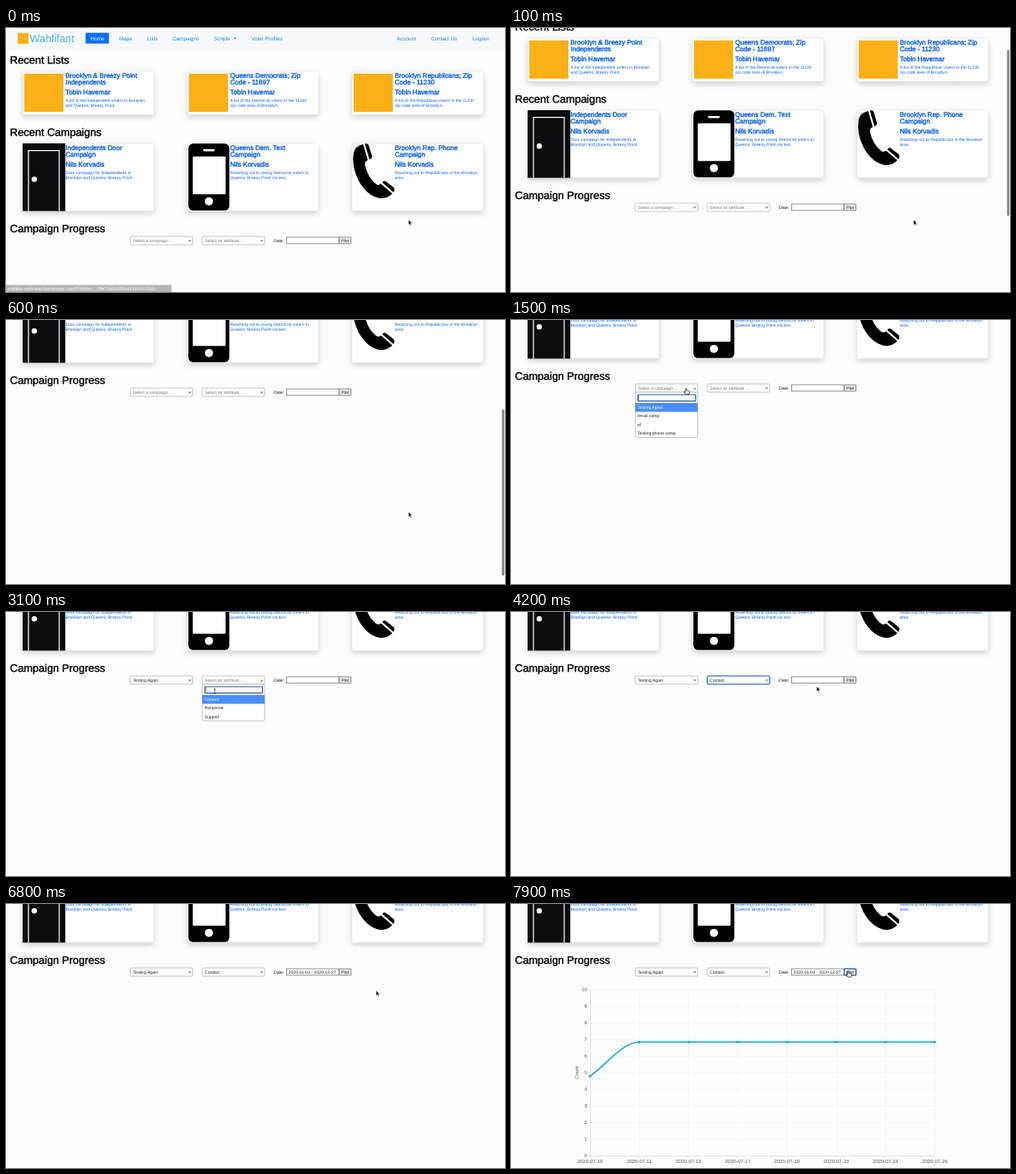
These frames come from a looping animation (600x318 px, 8000 ms). An HTML page:

```html
<!DOCTYPE html>
<html lang="en">
<head>
<meta charset="utf-8">
<title>Campaign dashboard</title>
<style>
  html, body { margin: 0; width: 100%; height: 100%; overflow: hidden; background: #fefdfe; }
  svg { display: block; width: 100%; height: 100%; }
  text { font-family: "Liberation Sans", Arial, sans-serif; text-rendering: geometricPrecision; white-space: pre; }
  .medium { stroke: currentColor; stroke-width: .4; }
  .card { filter: drop-shadow(0 3px 3px rgba(0, 0, 0, .17)); }
</style>
</head>
<body>
<svg id="stage" viewBox="0 0 600 318" xmlns="http://www.w3.org/2000/svg">
  <g id="page"></g>
  <g id="status"></g>
  <rect id="thumb" x="596.4" width="2.8" height="200" rx="1.4" fill="#858585"/>
  <g id="cursor">
    <path id="arrow" d="M0 0V6.4L1.5 5L2.5 7.3L3.6 6.8L2.6 4.6H4.6Z" fill="#111" stroke="#fff" stroke-width=".5"/>
    <path id="hand" d="M-.7 .6Q0-.4 .7 .6V2.8L3.6 3.5Q4.2 3.8 4 4.8L3.3 7.6H-.4L-2.5 4.6Q-2.4 3.6-1.5 4.1L-.7 4.8Z" fill="#fff" stroke="#111" stroke-width=".75"/>
    <path id="beam" d="M-1.3-3Q0-3 0-2Q0-3 1.3-3M0-2V2M-1.3 3Q0 3 0 2Q0 3 1.3 3" fill="none" stroke="#222" stroke-width=".7"/>
  </g>
</svg>
<script>
const LOOP = 8000, STEP = 100, MAX_SCROLL = 174;
const BLUE = '#0b6ff2', LINK = '#0a5fe2', NAV_LINK = '#1585e2', ORANGE = '#fcb017', INK = '#0c0c0e';
const byId = id => document.getElementById(id);

// Drawing helpers
const text = (x, y, size, str, fill = '#333', extra = '') =>
  `<text x="${x}" y="${y}" font-size="${size}" fill="${fill}" ${extra}>${str.replace(/&/g, '&amp;')}</text>`;
const medium = (x, y, size, str, fill) =>
  text(x, y, size, str, fill, `class="medium" color="${fill}"`);
const centered = (x, y, size, str, fill, extra = '') =>
  text(x, y, size, str, fill, `text-anchor="middle" ${extra}`);
const rect = (x, y, w, h, fill, extra = '') =>
  `<rect x="${x}" y="${y}" width="${w}" height="${h}" fill="${fill}" ${extra}/>`;
const path = (d, fill, extra = '') => `<path d="${d}" fill="${fill}" ${extra}/>`;
const circle = (x, y, r, fill) => `<circle cx="${x}" cy="${y}" r="${r}" fill="${fill}"/>`;
const outline = (color, width = .6, radius = 1.2) =>
  `stroke="${color}" stroke-width="${width}" rx="${radius}"`;
const during = (from, to, content) => `<g data-from="${from}" data-to="${to}">${content}</g>`;
const shifted = (dy, content) => `<g transform="translate(0 ${dy})">${content}</g>`;

function navbar() {
  const links = [[136, 'Maps'], [169.5, 'Lists'], [200, 'Campaigns'], [250, 'Scripts'],
    [295, 'Voter Profiles'], [470, 'Account'], [511, 'Contact Us'], [561, 'Logout']];
  return rect(0, 0, 600, 27, '#f7f8fa') + rect(14, 6, 13, 13, ORANGE) +
    text(28.5, 17, 13, 'Wahlifant', '#4db0e8') +
    rect(95.6, 5.8, 28.2, 13, BLUE, 'rx="1.4"') + text(101.6, 14.8, 6.3, 'Home', '#fff') +
    links.map(([x, label]) => text(x, 14.8, 6.35, label, NAV_LINK)).join('') +
    path('M273.5 11.4h4l-2 2z', NAV_LINK);
}

function card(x, y, height, icon, title, author, description) {
  const left = x + 51.5;
  return rect(x, y, 158, height, '#fff', `class="card" ${outline('#dcdcdf', .5, 2.5)}`) + icon +
    title.map((line, i) => medium(left, y + 8.2 + i * 8, 8, line, LINK)).join('') +
    medium(left, y + 28.4, 8, author, LINK) +
    description.map((line, i) => text(left, y + 36.6 + i * 6, 5.05, line, LINK)).join('');
}

function listCards() {
  return [
    [['Brooklyn & Breezy Point', 'Independents'],
      ['A list of the Independent voters in Brooklyn', 'and Queens, Breezy Point..']],
    [['Queens Democrats; Zip', 'Code - 11697'],
      ['A list of the Democrat voters in the 11230', 'zip code area of Brooklyn.']],
    [['Brooklyn Republicans; Zip', 'Code - 11230'],
      ['A list of the Republican voters in the 11230', 'zip code area of Brooklyn.']]
  ].map(([title, description], i) => {
    const x = 20 + i * 198;
    return card(x, 52, 52.5, rect(x + 2, 55, 47, 46, ORANGE), title, 'Tobin Havemar', description);
  }).join('');
}

function campaignCards() {
  const door = rect(20, 139, 51.3, 81.5, INK) +
    path('M27 220.5V147.7H64V220.5', 'none', 'stroke="#fff" stroke-width="1.2"') +
    circle(34, 182.2, 3.2, '#fff');
  const phone = rect(219.3, 139.3, 49.2, 80.5, '#000', 'rx="5.5"') +
    rect(224.6, 154.7, 39.4, 45.5, '#fff', 'rx="1"') +
    rect(237, 146, 14, 2.4, '#fff', 'rx="1.2"') + circle(244, 208.8, 4.9, '#fff');
  const handset = path('M429.5 140L435 159.2Q431 161 431.6 165Q435 180 445 188Q448 190 451 187.8L464.5 199.5' +
      'Q458 206 449 205Q434 202 424 184Q415 166 418 150Q420 142 429.5 140Z', '#000') +
    path('M431.5 139.5Q435 138.3 436 141L440 154Q440.5 157 437 158.4Z', '#000') +
    path('M452.6 186.2Q454 183.3 457 185L466 192Q468 194 466 198Z', '#000');
  const author = 'Nils Korvadis';
  return card(20, 139, 81.5, door, ['Independents Door', 'Campaign'], author,
      ['Door campaign for Independents in', 'Brooklyn and Queens, Breezy Point.']) +
    card(218, 139, 81.5, phone, ['Queens Dem. Text', 'Campaign'], author,
      ['Reaching out to young Democrat voters in', 'Queens, Breezy Point via text.']) +
    card(416, 139, 81.5, handset, ['Brooklyn Rep. Phone', 'Campaign'], author,
      ['Reaching out to Republicans in the Brooklyn', 'area.']);
}

// The form, calendar and chart use window coordinates at full scroll.
function select(x, hint, value, options, open, close, blur) {
  const label = (str, fill) => text(x + 3, 84, 5.15, str, fill);
  const bottom = 89.5 + options.length * 10.4 + 10.4;
  const arrowDown = path(`M${x + 69.5} 81.4h4l-2 2.2z`, '#777');
  const rows = options.map((option, i) =>
    (i ? '' : rect(x, 100, 75, 10.6, '#4b8ef8')) +
    text(x + 2.5, 107 + i * 10.4, 5.15, option, i ? '#222' : '#fff')).join('');
  return rect(x, 77, 75, 10, '#fff', outline('#a0a0a0')) +
    during(0, close, label(hint, '#777')) + during(close, LOOP, label(value, '#222')) +
    during(0, open, arrowDown) + during(close, LOOP, arrowDown) +
    during(close, blur, rect(x, 77, 75, 10, 'none', outline('#2a6bd0', 1.2))) +
    during(open, close,
      path(`M${x + 69.5} 83.6h4l-2-2.2z`, '#777') +
      rect(x, 87, 75, bottom - 87, '#fff', outline('#a0a0a0')) +
      rect(x + 3, 90, 69.5, 7.6, '#fff', outline('#24589f', 1.2, .8)) +
      rect(x + 4, 91.2, .5, 5.2, '#222') + rows);
}

function month(x, title, lead, previous, days) {
  const column = i => x + i * 12.1;
  let out = centered(column(3), 98.8, 5, title, '#222', 'font-weight="bold"');
  ['Su', 'Mo', 'Tu', 'We', 'Th', 'Fr', 'Sa'].forEach((name, i) =>
    out += centered(column(i), 108, 4.9, name, '#222', 'font-weight="bold"'));
  for (let i = 0; i < 42; i++) {
    const day = i - lead + 1, inside = day > 0 && day <= days;
    const shown = day < 1 ? previous + day : inside ? day : day - days;
    const cx = column(i % 7), cy = 115 + Math.floor(i / 7) * 9.25;
    const active = inside && day === 1 && title.startsWith('Jan');
    if (inside) out += rect(cx - 6.05, cy - 4.6, 12.1, 9.25, active ? '#2f78c0' : '#e7f1f6');
    out += centered(cx, cy + 1.7, 4.9, String(shown), active ? '#fff' : inside ? '#222' : '#999');
  }
  return out;
}

function calendar() {
  const chevron = d => path(d, 'none', 'stroke="#222" stroke-width=".9"');
  return rect(337.6, 88.8, 184, 98.2, '#fff', outline('#d8d8da')) +
    chevron('M348.3 94.8l-2.2 2.2l2.2 2.2') + chevron('M510.8 94.8l2.2 2.2l-2.2 2.2') +
    month(348, 'Jan 2020', 3, 31, 31) + month(438.7, 'Feb 2020', 6, 31, 29) +
    rect(337.6, 169.3, 184, .5, '#d8d8da') +
    text(421.5, 180, 4.55, '2020-01-01 - 2020-12-27', '#222') +
    text(481, 180, 4.7, 'Clear', '#222', 'font-weight="bold"') +
    rect(499, 172.8, 19.3, 10.8, BLUE, 'rx="1.2"') +
    centered(508.6, 180, 4.7, 'Apply', '#fff', 'font-weight="bold"');
}

function form() {
  const dateBox = extra => rect(337.6, 78, 62.6, 7.8, extra ? 'none' : '#fff', extra || outline('#666', .7, 0));
  const plotBox = extra => rect(400.6, 78, 14.2, 7.8, extra ? 'none' : '#eee', extra || outline('#555', .7, .4));
  return select(149.5, 'Select a campaign ...', 'Testing Again',
      ['Testing Again', 'email camp', 'ef', 'Testing phone camp'], 1400, 2100, 2700) +
    select(236, 'Select an attribute ...', 'Contact',
      ['Contact', 'Response', 'Support'], 2800, 3700, 4600) +
    text(322, 83.8, 5.15, 'Date:', '#111') + dateBox() + plotBox() +
    during(5900, LOOP, text(339.6, 83.8, 5.13, '2020-01-01 - 2020-12-27', '#222')) +
    during(4600, 5900, dateBox(outline('#2767c8', 1.2, .8))) +
    during(7500, LOOP, plotBox(outline('#2767c8', 1.2, .8))) +
    centered(407.7, 83.8, 5.1, 'Plot', '#111') +
    during(4600, 5900, calendar());
}

const chartX = i => 95 + i * 59.2;
const chartY = v => 303 - v * 20;

function chart() {
  let out = '';
  for (let v = 0; v <= 10; v++)
    out += rect(91.5, chartY(v), 418, .5, v ? '#ebebed' : '#c4c4c6') +
      text(91.5, chartY(v) + 2, 5.8, String(v), '#555', 'text-anchor="end"');
  [10, 11, 12, 17, 19, 23, 24, 26].forEach((day, i) =>
    out += rect(chartX(i), 103, .5, 203, i ? '#ebebed' : '#c4c4c6') +
      centered(chartX(i), 311.6, 6, `2020-07-${day}`, '#555'));
  return out + centered(0, 0, 5.8, 'Count', '#555', 'transform="translate(80.5 203) rotate(-90)"') +
    '<g id="series"></g>';
}

// Values grow from the base line with a quartic ease-out.
function series(time) {
  const progress = Math.min(1, Math.max(0, (time - 7650) / 1000));
  const grown = 1 - (1 - progress) ** 4;
  const low = chartY(7 * grown), high = chartY(10 * grown), third = 59.2 / 3;
  const slope = (high - low) / 3;
  const line = `M95 ${low}C${95 + third} ${low + slope} ${chartX(1) - third} ${high} ${chartX(1)} ${high}H${chartX(7)}`;
  let out = path(line, 'none', 'stroke="#17a7dc" stroke-width="1.6"');
  for (let i = 0; i < 8; i++) out += circle(chartX(i), i ? high : low, 1.5, '#17a7dc');
  return out;
}

byId('page').innerHTML = navbar() +
  medium(4.8, 42.6, 12.95, 'Recent Lists', '#000') + listCards() +
  medium(4.8, 130.4, 12.95, 'Recent Campaigns', '#000') + campaignCards() +
  medium(4.8, 245.6, 12.95, 'Campaign Progress', '#000') +
  shifted(MAX_SCROLL, during(7700, LOOP, chart()) + form());
byId('status').innerHTML = during(0, 100, rect(0, 309.5, 199, 8.5, '#b4b4b6') +
  text(1.5, 315.8, 5.48, 'politiker-web-app.herokuapp.com/Politiker/.../5fe7ba6c930ddf00047c556c', '#fff'));

// Motion: [time, values...]
const scrollKeys = [[0, 0], [100, 40], [200, 95], [300, 138], [400, 155], [500, 164], [600, 169], [700, 172], [900, MAX_SCROLL]];
const thumbKeys = [[0, 0], [100, 1], [1000, 1], [1200, 0]];
const cursorKeys = [[900, 484, 231], [1300, 210.5, 82], [1600, 210.5, 82], [1900, 186, 104], [2100, 186, 104],
  [2600, 262, 82], [2900, 260, 83], [3100, 251, 95.5], [3400, 249, 104], [3700, 249, 104],
  [4200, 367.5, 89.5], [4500, 372, 82], [4700, 372, 82], [5400, 505, 176.5], [6500, 505, 176.5],
  [6900, 425, 80], [7400, 405.5, 80.5]];
const shapes = [[0, 'arrow'], [1300, 'hand'], [1800, 'arrow'], [2500, 'hand'], [3000, 'beam'], [3300, 'arrow'],
  [4400, 'beam'], [4900, 'arrow'], [5400, 'hand'], [6600, 'arrow'], [7300, 'hand']];

function sample(keys, time) {
  const next = keys.findIndex(key => key[0] > time);
  if (next === 0) return keys[0].slice(1);
  if (next < 0) return keys[keys.length - 1].slice(1);
  const a = keys[next - 1], b = keys[next], k = (time - a[0]) / (b[0] - a[0]);
  return a.slice(1).map((v, i) => v + (b[i + 1] - v) * k);
}

const timed = [...document.querySelectorAll('[data-from]')];
const show = (el, on) => { el.style.display = on ? '' : 'none'; };

function render(time) {
  const [scroll] = sample(scrollKeys, time);
  byId('page').setAttribute('transform', `translate(0 ${-scroll})`);
  byId('thumb').setAttribute('y', 1 + scroll * 318 / 503);
  byId('thumb').setAttribute('opacity', sample(thumbKeys, time)[0]);
  byId('cursor').setAttribute('transform', `translate(${sample(cursorKeys, time).join(' ')})`);
  const shape = shapes.filter(([start]) => start <= time).pop()[1];
  ['arrow', 'hand', 'beam'].forEach(id => show(byId(id), id === shape));
  timed.forEach(el => show(el, time >= +el.dataset.from && time < +el.dataset.to));
  byId('series').innerHTML = series(time);
}

let start;
function tick(now) {
  start ??= now;
  render(Math.floor((now - start) % LOOP / STEP) * STEP);
  requestAnimationFrame(tick);
}
render(0);
requestAnimationFrame(tick);
</script>
</body>
</html>
```
